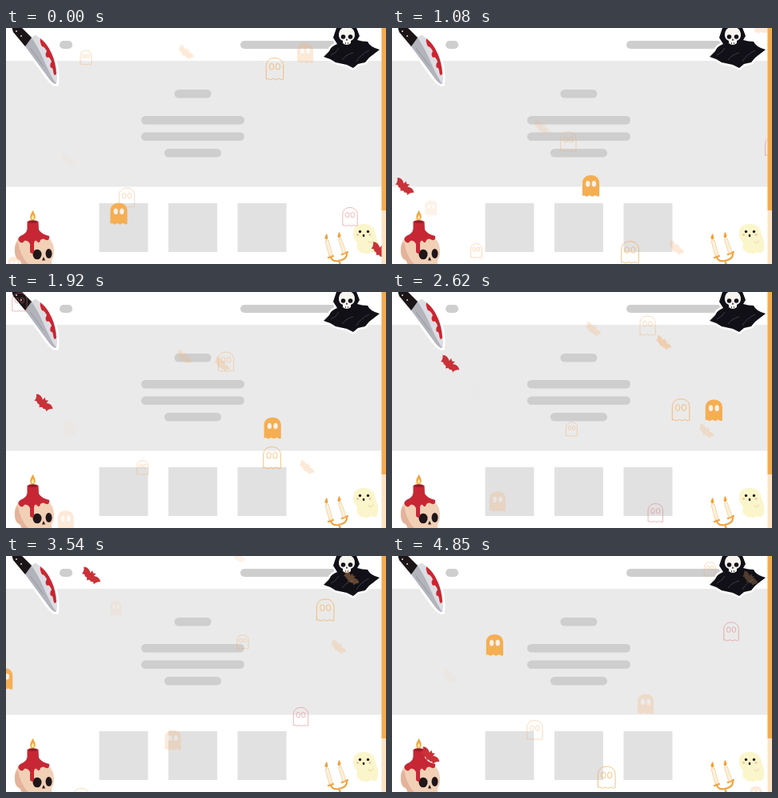
Recreate the animation shown at these times as an HTML page. Size 475x295 px, loop 4.92 s.

```html
<!DOCTYPE html>
<html lang="en">
<head>
<meta charset="utf-8">
<title>Spooky page</title>
<style>
  html, body { margin: 0; width: 100%; height: 100%; overflow: hidden; background: #fff; }
  svg { display: block; width: 475px; height: 295px; }
  .pill { fill: #cecece; }
  .card { fill: #e1e1e1; }
  .sticker { stroke: #fff; stroke-width: 6; stroke-linejoin: round; fill: #fff; }
  .line { fill: none; stroke: currentColor; }
  .solid { color: #f5ae52; --alpha: 1; }
  .blood { color: #c83238; --alpha: 1; }
  .glow { color: #f3a94d; --alpha: .7; }
  .rose { color: #e07070; --alpha: .5; }
  .mist { color: #f5a860; --alpha: .42; }
  .haze { color: #f8b070; --alpha: .27; }
  #motes use { opacity: calc(var(--alpha) * var(--pulse, 1)); }
</style>
</head>
<body>
<svg viewBox="0 0 475 295">
  <defs>
    <path id="body" d="M-10 12V-3C-10-9-6-12.5 0-12.5S10-9 10-3V12Q8.3 13.4 6.7 12T3.3 12T0 12T-3.3 12T-6.7 12T-10 12Z" vector-effect="non-scaling-stroke"/>
    <g id="eyes">
      <ellipse cx="-3.6" cy="-2.5" rx="2.5" ry="3.6" vector-effect="non-scaling-stroke"/>
      <ellipse cx="3.6" cy="-2.5" rx="2.5" ry="3.6" vector-effect="non-scaling-stroke"/>
    </g>
    <g id="outline" class="line"><use href="#body"/><use href="#eyes"/></g>
    <g id="ghost"><use href="#body" fill="currentColor"/><use href="#eyes" fill="#f5f0e8"/></g>
    <path id="bat" fill="currentColor" transform="rotate(42) scale(1.35)" d="M-14-2Q-9-6-3-2L-3-6L0-4L3-6L3-2Q9-6 14-2Q10 1 10 6Q7 3 5 6Q2 4 0 8Q-2 4-5 6Q-7 3-10 6Q-10 1-14-2Z"/>
    <path id="flame" d="M0-8C1-5 4-2 3 2Q2 5 0 5Q-3 5-3 2C-4-2-1-4 0-8Z"/>
    <path id="knife" d="M7-2H18L32 12L37 9Q49 17 57 32Q65 49 63 70Q59 70 55 65L24 23L9 5Z"/>
    <path id="cloak" d="M414-3L409 12L414 20Q406 23 404 29L397 36Q405 38 412 43L426 46L434 50L440 45L449 43L454 37L467 27Q455 24 452 17Q445 17 439 15L442 10L437-3Z"/>
  </defs>

  <g id="page">
    <rect width="475" height="295" fill="#fff"/>
    <rect y="41" width="470" height="157.500" fill="#eaeaea"/>
    <g class="pill">
      <rect x="67" y="16" width="16" height="10" rx="5"/>
      <rect x="293" y="16" width="122" height="10" rx="5"/>
      <rect x="210.500" y="77" width="46" height="10.500" rx="5.200"/>
      <rect x="169" y="110" width="129" height="10.500" rx="5.200"/>
      <rect x="169" y="130.500" width="129" height="10.500" rx="5.200"/>
      <rect x="198" y="151" width="71" height="10.500" rx="5.200"/>
    </g>
    <g class="card">
      <rect x="116.500" y="219" width="61" height="61"/>
      <rect x="203" y="219" width="61" height="61"/>
      <rect x="289.500" y="219" width="61" height="61"/>
    </g>
  </g>

  <g id="blade">
    <use href="#knife" class="sticker"/>
    <use href="#knife" fill="#b3b4bb"/>
    <path d="M32 12L37 9Q49 17 57 32Q65 49 63 70Q57 62 49 44Q41 25 32 12Z" fill="#dcdde2"/>
    <path d="M43 13Q52 20 57 32Q62 43 63 57Q60 62 59 54Q58 48 56 50Q54 46 57 42Q54 35 51 37Q48 33 51 29Q48 23 45 23Q42 18 43 13Z" fill="#cb2530"/>
    <path d="M30 25L47 48" stroke="#94959d" fill="none"/>
    <path d="M7-2H18L32 12L24 23L9 5Z" fill="#1c1518"/>
    <g fill="#d8d5d6"><circle cx="13" cy="4" r="1"/><circle cx="19" cy="10" r="1"/></g>
  </g>

  <g id="reaper">
    <use href="#cloak" class="sticker" style="stroke-width:5"/>
    <use href="#cloak" fill="#111017"/>
    <path d="M416 9Q416-1 426-1Q436-1 436 9Q436 14 431 16V19Q426 23 421 19V16Q416 14 416 9Z" fill="#f8f5f1"/>
    <g fill="#111017">
      <ellipse cx="421.500" cy="11" rx="2.800" ry="2.800"/>
      <ellipse cx="430.500" cy="11" rx="2.800" ry="2.800"/>
      <path d="M426 13L424.800 15.500H427.200Z"/>
    </g>
    <path d="M424.500 18V20M427.500 18V20" stroke="#111017" stroke-width=".7"/>
    <path d="M406 34Q413 31 416 25M420 40Q425 33 434 31M438 42Q443 33 454 28" fill="none" stroke="#4a4852" stroke-width=".8"/>
  </g>

  <g id="skull">
    <path d="M11 276Q12 257 34 257Q59 257 60 278Q60 287 57 290V297H20L18 291Q11 288 11 276Z" fill="#f1d0b6"/>
    <path d="M11 276Q10 288 18 291L20 297H30Q18 287 15 267Q11 270 11 276Z" fill="#e3b39c"/>
    <ellipse cx="39" cy="283" rx="5.500" ry="6.300" fill="#201619"/>
    <ellipse cx="53.500" cy="282" rx="4" ry="6" fill="#201619"/>
    <path d="M47 286L45 290.500H49Z" fill="#201619"/>
    <path d="M26.500 242Q33 238 40.500 242L41 252Q43 257 54 260Q55 266 50 265Q46 262 43 265Q42 271 38 266Q35 265 35 271V280Q33 284 30 280V270Q27 265 23 266Q20 271 16 266Q14 263 18 260Q26 257 26.500 251Z" fill="#c72734"/>
    <ellipse cx="33.500" cy="242.500" rx="6" ry="1.600" fill="#991d2b"/>
    <path d="M33.500 238V242" stroke="#3a2020"/>
    <use href="#flame" x="33.500" y="235.500" fill="#f2a33d"/>
    <use href="#flame" transform="translate(33.500 237) scale(.5)" fill="#ffe99a"/>
  </g>

  <g id="candles">
    <g fill="none" stroke="#eda343" stroke-width="2.200" stroke-linecap="round">
      <path d="M406 286Q408 293 416 291Q427 289 426 281M416 291L419 298M403 287L409 285M420 283L427 280"/>
    </g>
    <g fill="#fdf1d9" stroke="#eec78d" stroke-width=".7">
      <path d="M399 266L403 265L408 283L404 285Z"/>
      <path d="M415.500 264L419 263L425 280L421 282Z"/>
    </g>
    <g fill="#f0a23c">
      <use href="#flame" transform="translate(400.500 261.500) scale(.6)"/>
      <use href="#flame" transform="translate(416.500 259.500) scale(.6)"/>
    </g>
  </g>

  <g id="buddy">
    <path d="M434 257Q434 245 447 245Q458 245 461 254Q463 262 465 268Q466 278 462 281Q459 282 456 280Q452 284 448 281Q443 282 441 278Q437 276 439 268Q434 264 434 257Z" fill="#fbf5cb"/>
    <path d="M452 266Q456 271 459 266" fill="none" stroke="#e8d9a4"/>
    <g fill="#231d1b"><circle cx="442.500" cy="254.500" r="1.700"/><circle cx="452.500" cy="254.500" r="1.700"/><ellipse cx="447" cy="259.500" rx="1.300" ry="1.700"/></g>
    <g fill="#f4bfa5"><circle cx="439.500" cy="258.500" r="1.400"/><circle cx="455" cy="258.500" r="1.400"/></g>
  </g>

  <g id="motes"></g>

  <g id="scrollbar">
    <rect x="469.500" width="5.500" height="295" fill="#fbe3c3"/>
    <rect x="469.500" width="5.500" height="228" fill="#f3ab50"/>
  </g>
</svg>
<script>
const LOOP = 4.92, STEP = LOOP / 64, WIDTH = 470, HEIGHT = 295;
const layer = document.getElementById('motes');
const motes = [];

// at: start; v: pixels per second; entry: where it comes back along the opposite edge;
// peak: part of the loop at which a pulsing mote is brightest
function mote(shape, style, size, { at, v, entry = [], peak }) {
  const el = document.createElementNS('http://www.w3.org/2000/svg', 'use');
  el.setAttribute('href', '#' + shape);
  el.classList.add(style);
  layer.append(el);
  motes.push({ el, size, at, v, entry, peak });
}

mote('ghost', 'haze', 1, { at: [374, 31], v: [83, -34.5], entry: [21] });
mote('ghost', 'haze', .74, { at: [10, 295], v: [36, -65], entry: [450], peak: 0 });
mote('bat', 'haze', .62, { at: [225, 30], v: [24.5, -65.5], entry: [344] });
mote('bat', 'haze', .62, { at: [143, 178], v: [41.5, -50.5], entry: [359], peak: .5 });
mote('bat', 'mist', .62, { at: [78, 165], v: [100, -39], entry: [182], peak: .6 });
mote('outline', 'mist', .7, { at: [100, 37], v: [77.5, -69.5], entry: [75] });
mote('outline', 'mist', .96, { at: [151, 212], v: [64.5, -65], entry: [89] });
mote('outline', 'rose', .92, { at: [430, 236], v: [42.5, -81.5], entry: [69, 313] });
mote('outline', 'glow', 1.08, { at: [336, 51], v: [41.3, -86.5], entry: [284, 253] });
mote('bat', 'blood', .74, { at: [468, 278], v: [36.8, -70.5], entry: [249, 18] });
mote('ghost', 'solid', 1.06, { at: [141, 232], v: [100, -32.2], entry: [157] });

// Straight drift up and right; each exit re-enters from the opposite edge
function place({ size, at: [x, y], v: [vx, vy], entry }, t) {
  const r = 5 + 8 * size;
  for (const free of entry) {
    const right = (WIDTH + r - x) / vx, top = (y + r) / -vy;
    const exit = Math.min(right, top);
    if (t < exit) break;
    t -= exit;
    [x, y] = right < top ? [-r, free] : [free, HEIGHT + r];
  }
  return [x + vx * t, y + vy * t];
}

function draw(seconds) {
  // Even steps, whose starts are rounded to hundredths of a second
  const t = Math.floor((seconds % LOOP) / STEP + .065) * STEP % LOOP;
  for (const m of motes) {
    const [x, y] = place(m, t);
    m.el.setAttribute('transform', `translate(${x} ${y}) scale(${m.size})`);
    if (m.peak !== undefined) {
      m.el.style.setProperty('--pulse', .5 + .5 * Math.cos(2 * Math.PI * (t / LOOP - m.peak)));
    }
  }
}

const start = performance.now();
function tick() {
  draw((performance.now() - start) / 1000);
  requestAnimationFrame(tick);
}
tick();
</script>
</body>
</html>
```
